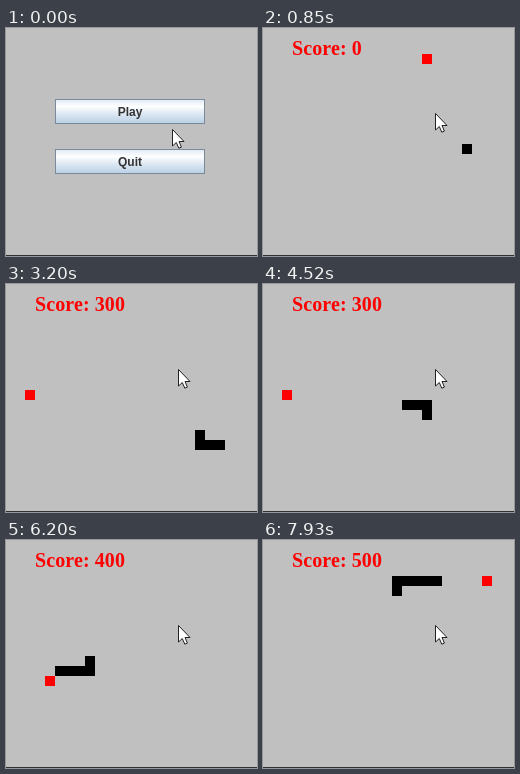
Animation, 251 px wide and 228 px high, one loop 8000 ms. Source, as an HTML page with a canvas:

```html
<!DOCTYPE html>
<html lang="en">
<head>
<meta charset="utf-8">
<title>Snake</title>
<style>
  html, body { margin: 0; width: 100%; height: 100%; overflow: hidden; background: #c0c0c0; }
  canvas { display: block; }
</style>
</head>
<body>
<canvas id="stage" width="251" height="228"></canvas>
<script>
const ctx = document.getElementById('stage').getContext('2d');
const LOOP = 8000, CELL = 10;
const PRESS = 288;       // the button goes down and the snake starts
const GAME_SHOWN = 430;
const MOVE_TIME = 64;

// Direction and number of cells; a star marks food at the end of the leg
const ROUTE = 'R9 U9 L5* L2 D8 R1* R4 D5 R1* R4 D2 L8 U6 L10 U1 L4* L1 D1 R7 D1 L5 D1 R1* R9 U10 R9*';
const STEP = { R: [1, 0], L: [-1, 0], U: [0, -1], D: [0, 1] };

const path = [[11, 11]];
const meals = [];        // indices into path
for (const leg of ROUTE.split(' ')) {
  const [dx, dy] = STEP[leg[0]];
  for (let i = parseInt(leg.slice(1)); i > 0; i--) {
    const [x, y] = path[path.length - 1];
    path.push([x + dx, y + dy]);
  }
  if (leg.endsWith('*')) meals.push(path.length - 1);
}

function cell([x, y], color) {
  ctx.fillStyle = color;
  ctx.fillRect(9 + x * CELL, 6 + y * CELL, CELL, CELL);
}

function drawGame(t) {
  const head = Math.floor((t - PRESS) / MOVE_TIME);
  const eaten = meals.filter(m => m <= head).length;
  cell(path[meals[eaten]], '#f00');
  path.slice(Math.max(0, head - eaten), head + 1).forEach(c => cell(c, '#000'));
  ctx.fillStyle = '#f00';
  ctx.font = 'bold 20px "Liberation Serif", serif';
  ctx.letterSpacing = '0.1px';
  ctx.textAlign = 'left';
  ctx.fillText('Score: ' + eaten * 100, 29, 27);
}

function drawButton(label, y, state) {
  const x = 49, w = 150, h = 25;
  const fill = ctx.createLinearGradient(0, y, 0, y + h);
  fill.addColorStop(0, '#dde8f3');
  fill.addColorStop(0.3, '#fff');
  fill.addColorStop(0.6, '#dde8f3');
  fill.addColorStop(1, '#b8cfe5');
  ctx.fillStyle = state === 'pressed' ? '#b8cfe5' : fill;
  ctx.fillRect(x, y, w, h);
  if (state === 'hover') {
    ctx.strokeStyle = '#b8cfe5';
    ctx.lineWidth = 2;
    ctx.strokeRect(x + 2, y + 2, w - 4, h - 4);
  }
  ctx.strokeStyle = '#7a8a99';
  ctx.lineWidth = 1;
  ctx.strokeRect(x + 0.5, y + 0.5, w - 1, h - 1);
  ctx.fillStyle = '#333';
  ctx.font = 'bold 12px "Liberation Sans", sans-serif';
  ctx.letterSpacing = '0px';
  ctx.textAlign = 'center';
  ctx.fillText(label, x + w / 2, y + 17);
}

function drawMenu(t, pointerY) {
  drawButton('Play', 71, t >= PRESS ? 'pressed' : pointerY < 96 ? 'hover' : '');
  drawButton('Quit', 121, '');
}

const arrow = new Path2D('M.5 .5V17L4.3 13.5L6.8 19.2L9.4 18.1L7 12.5H12Z');

function drawPointer(x, y) {
  ctx.save();
  ctx.translate(x, y);
  ctx.fillStyle = '#fff';
  ctx.strokeStyle = '#222';
  ctx.lineWidth = 1;
  ctx.fill(arrow);
  ctx.stroke(arrow);
  ctx.restore();
}

function draw(t) {
  ctx.fillStyle = '#c0c0c0';
  ctx.fillRect(0, 0, 251, 228);
  ctx.fillStyle = '#303030';
  ctx.fillRect(0, 227, 251, 1);
  const slide = Math.min(1, t / 220);
  const x = Math.round(166 + 6 * slide), y = Math.round(101 - 16 * slide);
  if (t < GAME_SHOWN) drawMenu(t, y);
  else drawGame(t);
  drawPointer(x, y);
}

const start = performance.now();
function tick() {
  draw((performance.now() - start) % LOOP);
  requestAnimationFrame(tick);
}
tick();
</script>
</body>
</html>
```
